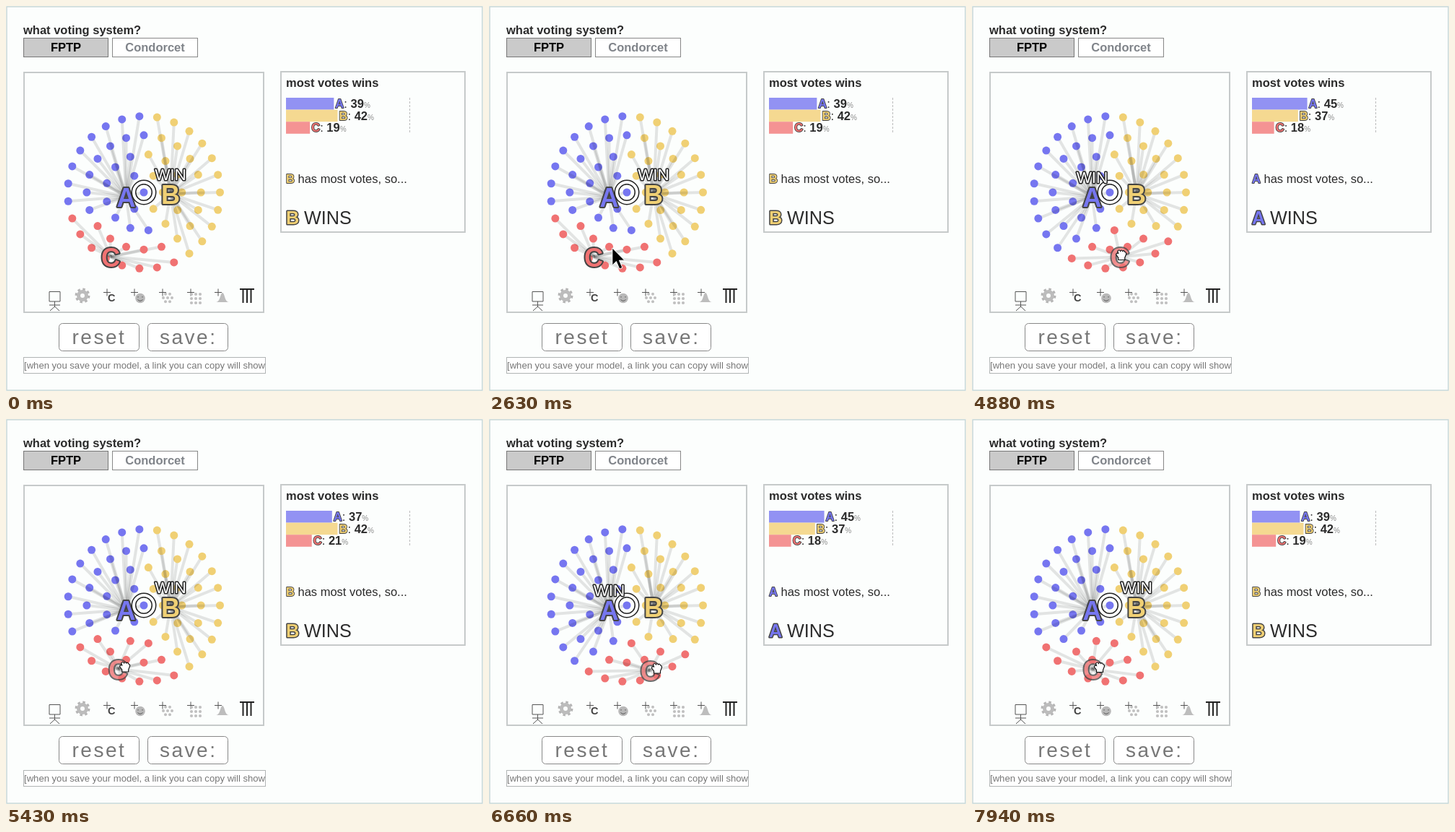
Recreate the animation shown at these times as an HTML page. Size 661x533 px, loop 8 s.

```html
<!DOCTYPE html>
<html lang="en">
<head>
<meta charset="utf-8">
<title>Voting model</title>
<style>
  html, body { margin: 0; width: 100%; height: 100%; overflow: hidden; background: #fcfefd; }
  svg { display: block; width: 661px; height: 533px; font-family: "Liberation Sans", Arial, sans-serif; font-size: 16.5px; fill: #2b2b2b; }
  .bold { font-weight: bold; }
  .icon { font-weight: bold; stroke: #444; paint-order: stroke; stroke-linejoin: round; }
  .mid { text-anchor: middle; }
  .line { fill: none; stroke: #555; }
</style>
</head>
<body>
<svg viewBox="0 0 661 533">
  <rect x="1" y="1" width="659" height="531" fill="none" stroke="#c9d8d8" stroke-width="1.5"/>
  <text class="bold" x="24" y="39">what voting system?</text>
  <rect x="24.5" y="44.5" width="117" height="26" fill="#cacaca" stroke="#777"/>
  <text class="bold mid" x="83" y="63" fill="#000">FPTP</text>
  <rect x="147.5" y="44.5" width="118" height="26" fill="#fff" stroke="#888"/>
  <text class="bold mid" x="206.5" y="63" fill="#80848a">Condorcet</text>
  <g fill="none" stroke="#c6caca" stroke-width="2">
    <rect x="25" y="92" width="332" height="332"/>
    <rect x="381" y="91" width="255" height="222"/>
  </g>
  <text class="bold" x="388" y="112">most votes wins</text>
  <path d="M559.5 127V177" stroke="#bbb" stroke-dasharray="3 2"/>

  <g id="tools">
    <path class="line" d="M60 395.500H75V409H60ZM67.500 409V417M60 414H75M61 422L67.500 416L74 422"/>
    <circle cx="106" cy="401" r="8.700" fill="none" stroke="#b4b4b4" stroke-width="3.500" stroke-dasharray="3.400 3.430"/>
    <circle cx="106" cy="401" r="5.500" fill="none" stroke="#bcbcbc" stroke-width="5"/>
    <text class="bold" x="141" y="409" font-size="14.500" fill="#444">C</text>
    <circle cx="186" cy="404.500" r="6.800" fill="#b8b8b8"/>
    <path class="line" d="M182.500 406.500Q186 410 189.500 406.500M183 402V403.500M189 402V403.500"/>
    <path d="M291 410C297 410 297 397 300 397S303 410 309 410Z" fill="#bdbdbd"/>
    <path d="M324 392H344M328.500 393V411M334 393V411M339.500 393V411" stroke="#222" stroke-width="2"/>
  </g>

  <g fill="#fff" stroke="#888">
    <rect x="73.500" y="439.500" width="111" height="38" rx="5"/>
    <rect x="196.500" y="439.500" width="111" height="38" rx="5"/>
    <rect x="24.500" y="486.500" width="335" height="22" stroke="#b0b4b4"/>
  </g>
  <g font-size="28" letter-spacing="2.500" fill="#777">
    <text x="91.500" y="468">reset</text>
    <text x="213" y="468">save:</text>
  </g>
  <clipPath id="field"><rect x="25" y="487" width="334" height="21"/></clipPath>
  <text x="25" y="502" font-size="13.100" fill="#777" clip-path="url(#field)">[when you save your model, a link you can copy will show</text>

  <g id="scene"></g>
</svg>
<script>
const LOOP = 8000;
const DOT = { A: '#7676f0', B: '#f0d074', C: '#f07272' };
const BAR = { A: '#9292f3', B: '#f5d991', C: '#f49393' };
const MID = { x: 191, y: 258 };
const RING_GAP = 26.38;
const scene = document.getElementById('scene');

// Voters stand on four rings around one in the middle.
const voters = [{ ...MID }];
for (let ring = 1; ring <= 4; ring++) {
  const count = 7 * ring - 1;
  for (let i = 0; i < count; i++) {
    const a = i / count * 2 * Math.PI;
    voters.push({ x: MID.x + ring * RING_GAP * Math.cos(a), y: MID.y + ring * RING_GAP * Math.sin(a) });
  }
}

const dot = (x, y, r, fill) => `<circle cx="${x}" cy="${y}" r="${r}" fill="${fill}"/>`;

function buildTools() {
  let s = '';
  for (const x of [140, 178, 217, 256, 294]) s += `<path class="line" d="M${x - 5} 396.5H${x + 5}M${x} 391.5V401.500"/>`;
  for (let i = -1; i <= 1; i++) {
    for (let j = -1; j <= 1; j++) s += dot(263 + i * 6, 405 + j * 6, 2.1, '#c0c0c0');
  }
  s += dot(224, 404, 2, '#c0c0c0');
  for (let i = 0; i < 6; i++) {
    const a = i * Math.PI / 3;
    s += dot(224 + 6 * Math.cos(a), 404 + 6 * Math.sin(a), 2, '#c0c0c0');
  }
  document.getElementById('tools').insertAdjacentHTML('beforeend', s);
}

// Screen updates come in a fixed number of steps per move.
function steps(t, from, to, n) {
  if (t < from) return 0;
  return Math.min(n, Math.floor((t - from) / (to - from) * (n - 1) + 0.1) + 1) / n;
}

const curve = (p, a, b, c) => (1 - p) ** 2 * a + 2 * p * (1 - p) * b + p * p * c;
const easeOut = p => 1 - (1 - p) ** 2;
const smooth = p => p * p * (3 - 2 * p);

const drags = [
  { from: 3670, to: 4480, n: 7, x: 222.5, y: 348, ease: easeOut, lift: 2.7 },
  { from: 4730, to: 5430, n: 6, x: 155.2, y: 346, ease: smooth, lift: 0 },
  { from: 5840, to: 6660, n: 7, x: 223, y: 348, ease: smooth, lift: 2 },
  { from: 7190, to: 7940, n: 7, x: 167, y: 346.5, ease: smooth, lift: 0 }
];

function dragState(t) {
  let x = 145, y = 347, lead = 0;
  for (const d of drags) {
    const p = steps(t, d.from, d.to, d.n);
    if (!p) break;
    const e = d.ease(p), arc = Math.sin(Math.PI * p);
    lead = 9 * arc * Math.sign(d.x - x);
    x += (d.x - x) * e;
    y += (d.y - y) * e - d.lift * arc;
  }
  return { x, y, lead };
}

function arrow(x, y) {
  return `<path transform="translate(${x} ${y})" d="M0 0V24L5.5 18.500L10 29L14 27.200L9.600 17.200H17Z" fill="#000" stroke="#fff"/>`;
}

function hand(x, y, open) {
  const d = open
    ? 'M-4 9L-9 1Q-9-2-5 1L-7-6Q-5-9-3-5L-2-9Q0-10 1-5L3-8Q5-9 5-4L8-5Q10-4 8 0L6 9Z'
    : 'M-4 7V4L-7 0Q-7-3-4-2L-5-5Q-3-8-1-5Q0-8 2-5Q4-7 5-4Q7-4 7-1L5 4V7Z';
  return `<path transform="translate(${x} ${y})" d="${d}" fill="#fff" stroke="#111" stroke-width="1.200"/>`;
}

function icon(id, x, y, size, width, extra = '') {
  return `<text class="icon" x="${x}" y="${y}" font-size="${size}" fill="${DOT[id]}" stroke-width="${width}" ${extra}>${id}</text>`;
}

function cursor(t, c) {
  if (t < 670) return '';
  if (t >= 2755) return hand(c.x + 9.5 + c.lead, c.y - 3, t < 2880);
  if (t < 1805) {
    const p = steps(t, 670, 1670, 8);
    return arrow(curve(p, 105, 272, 273), curve(p, 542, 402, 321));
  }
  const p = steps(t, 1810, 2760, 8);
  return arrow(curve(p, 273, 219, 155), curve(p, 321, 315, 341));
}

function drawModel(cands, votes, winner, held) {
  let s = '';
  voters.forEach((v, i) => {
    const c = cands[votes[i]];
    s += `<path d="M${v.x} ${v.y}L${c.x} ${c.y}" stroke="#000" stroke-opacity=".1" stroke-width="4"/>`;
    s += dot(v.x, v.y, 5.5, DOT[votes[i]]);
  });
  for (const id in cands) {
    const c = cands[id];
    s += icon(id, c.x, c.y + 13.5, 36, 4, `text-anchor="middle" opacity="${id === 'C' && held ? 0.78 : 1}"`);
  }
  for (const [color, w] of [['#222', 7], ['#fff', 4]]) {
    s += `<circle cx="${MID.x}" cy="${MID.y}" r="14" fill="none" stroke="${color}" stroke-width="${w}"/>`;
  }
  const w = cands[winner];
  s += `<text class="mid" x="${w.x}" y="${w.y - 19.5}" font-size="22.500" fill="#fff" stroke="#222" stroke-width="3" paint-order="stroke" stroke-linejoin="round">WIN</text>`;
  return s;
}

function drawResult(counts, winner) {
  let s = '';
  Object.keys(counts).forEach((id, i) => {
    const share = counts[id] / voters.length;
    const y = 127 + i * 16.6, end = 388 + share * 171;
    s += `<rect x="388" y="${y}" width="${end - 388}" height="16.600" fill="${BAR[id]}"/>`;
    s += icon(id, end + 2, y + 14, 16.5, 1.8);
    s += `<text x="${end + 14}" y="${y + 14}">: <tspan class="bold">${Math.round(share * 100)}</tspan><tspan font-size="10" fill="#888">%</tspan></text>`;
  });
  s += icon(winner, 388, 245, 16.5, 1.8) + '<text x="404.500" y="245">has most votes, so...</text>';
  s += icon(winner, 388, 302, 25.2, 3) + '<text x="413" y="302" font-size="25.200">WINS</text>';
  return s;
}

function render(t) {
  const c = dragState(t);
  const cands = { A: { x: 166.5, y: 264 }, B: { x: 228, y: 260 }, C: c };
  const counts = { A: 0, B: 0, C: 0 };
  const gap = (v, id) => Math.hypot(v.x - cands[id].x, v.y - cands[id].y);
  const votes = voters.map(v => {
    const id = Object.keys(cands).reduce((a, b) => gap(v, b) < gap(v, a) ? b : a);
    counts[id]++;
    return id;
  });
  const winner = Object.keys(counts).reduce((a, b) => counts[b] > counts[a] ? b : a);
  return drawModel(cands, votes, winner, t >= 2755) + drawResult(counts, winner) + cursor(t, c);
}

let shown = '';
function tick() {
  const html = render(performance.now() % LOOP);
  if (html !== shown) scene.innerHTML = shown = html;
  requestAnimationFrame(tick);
}

buildTools();
tick();
</script>
</body>
</html>
```
